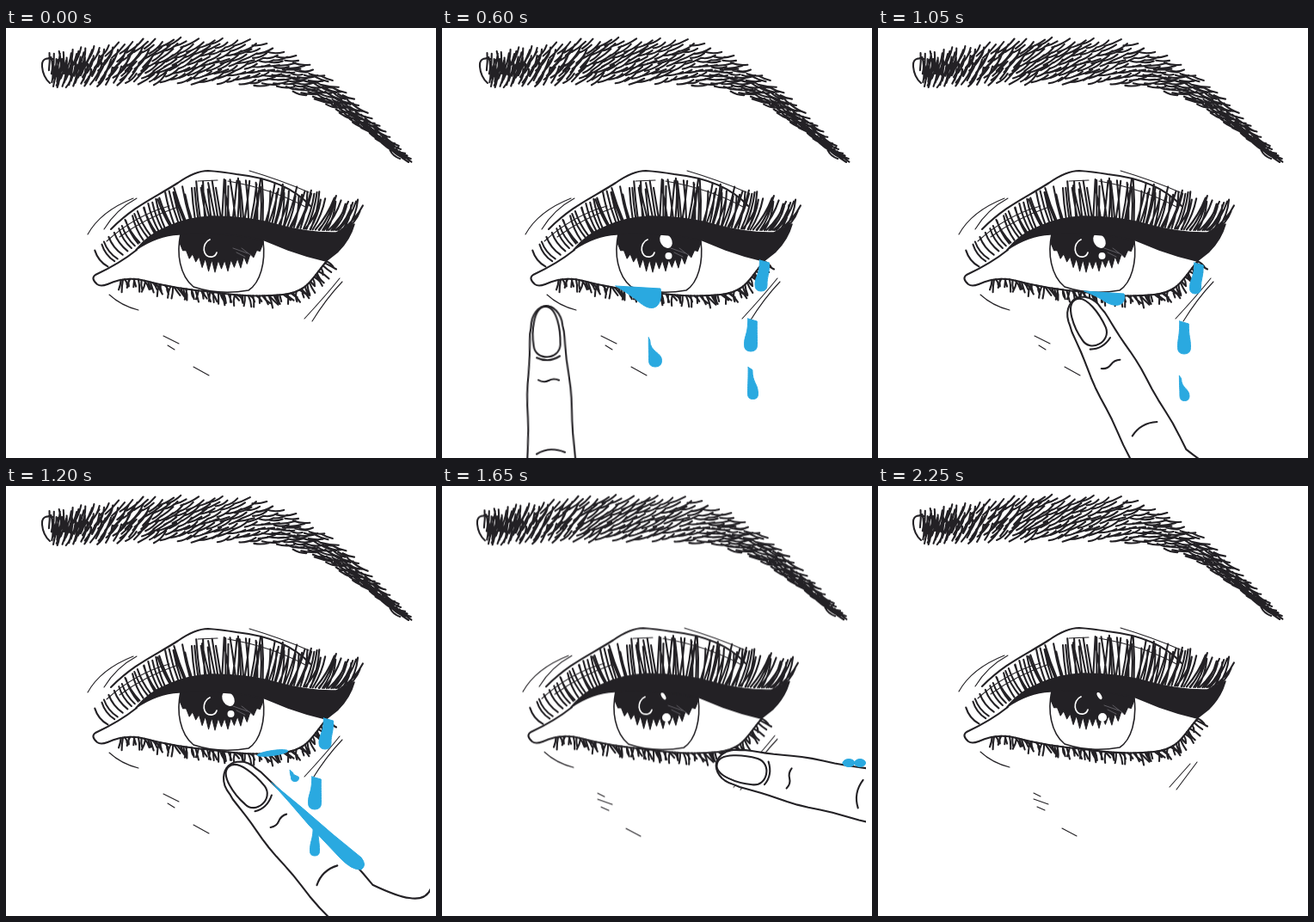
An HTML page that plays this animation: 500 px wide and 500 px high, repeating every 2400 ms.

```html
<!DOCTYPE html>
<html lang="en">
<head>
<meta charset="utf-8">
<title>Wiping a tear</title>
<style>
html, body { margin: 0; width: 100%; height: 100%; overflow: hidden; background: #fff; }
svg { display: block; width: 100vw; height: 100vh; }
path { fill: none; stroke: #232125; stroke-width: 2.1; stroke-linecap: round; stroke-linejoin: round; }
.fine { stroke-width: 1.1; }
.mid { stroke-width: 1.6; }
.ink { fill: #232125; }
.skin { fill: #fff; }
.tear { fill: #2aa9e0; stroke: #2aa9e0; stroke-width: 1; }
.glint { fill: #fff; stroke: none; }
.moon { stroke: #fff; stroke-width: 1.7; }
.ray { stroke: #66646a; stroke-width: .9; }
#eye { animation: jitter 2400ms step-end infinite; }
@keyframes jitter {
  0%, 12.5%, 50% { transform: translate(0, 0); }
  6.25% { transform: translate(1px, 0); }
  18.75% { transform: translate(-1px, -.5px); }
  25%, 31.25% { transform: translate(2px, 0); }
  37.5% { transform: translate(-4px, 0); }
  43.75% { transform: translate(-1px, 0); }
  56.25%, 68.75% { transform: translate(-1px, -.7px); }
  62.5%, 87.5% { transform: translate(0, -1px); }
  75%, 81.25% { transform: translate(2px, -1px); }
  93.75%, 100% { transform: translate(-1px, -1px); }
}
</style>
</head>
<body>
<svg viewBox="0 0 500 500">
  <defs><clipPath id="edge"><rect width="493" height="500"/></clipPath></defs>
  <g id="eye"></g>
  <g id="under"></g>
  <g id="hand" clip-path="url(#edge)"></g>
  <g id="over"></g>
</svg>
<script>
const STEP = 150, COUNT = 16;
const [eye, under, hand, over] = ['eye', 'under', 'hand', 'over'].map(id => document.getElementById(id));

let seed = 11;
const rnd = () => (seed = (seed * 16807) % 2147483647) / 2147483647;
const spread = n => (rnd() - .5) * 2 * n;
const mix = (a, b, t) => a + (b - a) * t;
const mixAll = (a, b, t) => a.map((v, i) => mix(v, b[i], t));
const rad = deg => deg * Math.PI / 180;
const f = n => n.toFixed(1);

function make(parent, tag) {
  return parent.appendChild(document.createElementNS('http://www.w3.org/2000/svg', tag));
}
function add(parent, d, cls = '') {
  const el = make(parent, 'path');
  el.setAttribute('d', d);
  el.setAttribute('class', cls);
  return el;
}

const rules = new Set();
function show(el, from, to = from) {
  const n = to - from + 1;
  rules.add(`@keyframes on${n}{0%{visibility:visible}${n / COUNT * 100}%,100%{visibility:hidden}}`);
  el.style.visibility = 'hidden';
  el.style.animation = `on${n} ${STEP * COUNT}ms ${(from - COUNT) * STEP}ms step-end infinite`;
}
function scene(parent, from, to) {
  const g = make(parent, 'g');
  show(g, from, to);
  return g;
}

// Measures a path so that strokes can be set along it.
function guide(d) {
  const el = add(eye, d), total = el.getTotalLength();
  el.remove();
  return t => { const p = el.getPointAtLength(t * total); return [p.x, p.y]; };
}

function oval(cx, cy, rx, ry, turn = 0) {
  const dx = rx * Math.cos(rad(turn)), dy = rx * Math.sin(rad(turn));
  return `M${cx - dx} ${cy - dy}a${rx} ${ry} ${turn} 1 0 ${2 * dx} ${2 * dy}a${rx} ${ry} ${turn} 1 0 ${-2 * dx} ${-2 * dy}Z`;
}

// One bent hair through its middle or from its root.
function hair(x, y, ang, len, bend, from = .5) {
  const c = Math.cos(ang) * len, s = Math.sin(ang) * len;
  const mx = x + c * (.5 - from) - Math.sin(ang) * bend, my = y + s * (.5 - from) + Math.cos(ang) * bend;
  return `M${f(x - c * from)} ${f(y - s * from)}Q${f(mx)} ${f(my)} ${f(x + c * (1 - from))} ${f(y + s * (1 - from))}`;
}

function drawBrow() {
  const spine = guide('M52 50C100 42 190 36 255 39C350 42 390 85 464 151');
  const n = 330;
  let d = '';
  for (let i = 0; i < n; i++) {
    const u = Math.pow((i + rnd()) / n, 1.15), v = (i * .618) % 1 * 2 - 1;
    const [x, y] = spine(u), [x2, y2] = spine(Math.min(1, u + .01)), [x1, y1] = spine(Math.max(0, u - .01));
    const dir = Math.atan2(y2 - y1, x2 - x1);
    const half = u < .55 ? mix(21, 28, Math.min(1, u * 4)) : mix(27, 4, Math.pow((u - .55) / .45, .75));
    const lean = rad(mix(-78, -38, Math.min(1, u * 3)) * (1 - u * .72) + spread(11));
    const len = mix(17, 27, rnd()) * (1 - u * .25);
    const off = v * Math.max(0, half - Math.abs(Math.sin(lean)) * len / 2);
    d += hair(x - Math.sin(dir) * off, y + Math.cos(dir) * off, dir + lean, len, 1 + rnd() * 2.5);
  }
  add(eye, d + 'M54 36Q41 33 42 45Q43 57 51 64');
}

const RIM = 'M118 298Q140 288 162 294Q195 303 240 307Q285 314 322 310C352 307 356 290 373 271';
const LID = 'M114 281C150 252 185 222 240 221C300 220 340 240 398 234';

function drawLids() {
  add(eye, 'M122 234C150 206 172 198 200 180Q220 166 235 166Q250 167 268 170C305 174 335 186 354 207');
  add(eye, 'M152 258Q132 274 104 287Q98 291 106 298Q110 301 118 298');
  add(eye, RIM);
  add(eye, `M95 240Q110 213 148 198M114 234Q128 211 152 198M117 248Q150 218 190 207M132 243Q160 222 200 208
    M283 166Q320 177 352 191M223 178L246 177M258 178Q310 187 350 209M120 310Q134 323 154 328`, 'fine');
}

function drawIris() {
  add(eye, 'M203 240C198 262 202 288 218 301Q248 311 282 305C296 296 302 272 299 248', 'mid');
  let d = 'M299 232L203 232';
  for (let i = 0; i <= 26; i++) {
    const t = i / 26, arch = Math.pow(Math.sin(Math.PI * t), .6) || 0;
    const spike = i % 2 ? 9 + rnd() * 7 : 0;
    d += `L${f(mix(202, 299, t))} ${f(250 + arch * 20 + spike * arch)}`;
  }
  add(eye, d + 'Z', 'ink fine');
  add(eye, 'M264 256L281 262M268 261L278 266M274 256L287 266', 'ray');
  add(eye, 'M237 246C227 250 228 268 240 266Q244 265 245 261', 'moon');
  const big = scene(eye, 1, 9), small = scene(eye, 10, 15);
  add(big, oval(258.5, 247.5, 9, 6.5, 58) + oval(261.5, 265, 4, 4), 'glint');
  add(small, oval(258.5, 245, 4.5, 2.2, 60) + oval(262, 270, 5, 5), 'glint');
}

function drawLiner() {
  add(eye, 'M151 258Q166 240 186 232Q211 220 240 219Q282 219 316 229Q354 239 384 238L405 228Q400 246 386 260L372 271Q350 266 328 258L301 247Q250 236 201 240Q176 241 151 258Z', 'ink mid');
}

function drawLashes() {
  const lid = guide(LID), rim = guide(RIM), n = 92;
  let d = '';
  for (let i = 0; i < n; i++) {
    const t = Math.pow((i + rnd() * .8) / n, .72), [x, y] = lid(t);
    const full = 24 + 26 * Math.sin(Math.PI * Math.min(1, t * .72 + .02)) ** 1.5 * (t > .9 ? .85 : 1);
    const ang = rad(mix(-132, -58, t) + spread(3 + 9 * t));
    d += hair(x, y, ang, full * (1 - rnd() * (t < .3 ? .1 : .3)), mix(-5, 5, t), 0);
  }
  for (let i = 0; i < 84; i++) {
    const t = .05 + .95 * (i + rnd()) / 84, [x, y] = rim(t);
    d += hair(x, y, rad(mix(82, 48, t * t) + spread(28)), 7 + rnd() * 8, spread(2), 0);
  }
  add(eye, d);
}

function drawCreases() {
  add(scene(eye, 0, 8), 'M183 358L201 367M188 369L196 374M218 394L236 404', 'fine');
  add(scene(eye, 9, 15), 'M182 358L190 362M182 365L199 371M186 374L195 378M215 399L232 408', 'fine');
  add(scene(eye, 0, 11), 'M388 291Q372 311 347 338M391 295Q372 315 356 341', 'fine');
  add(scene(eye, 11, 15), 'M372 322L348 354M364 324L340 351', 'fine');
}

// Finger with its tip at 0,0, pointing up; the right side flares into the hand.
function finger(g, [x, y, turn, wide]) {
  const half = d => wide * (15 * Math.sqrt(1 - (1 - Math.min(d / 20, 1)) ** 2) + 14 * (1 - Math.exp(-d / 85)));
  const side = (sign, end) => {
    const p = [];
    for (let k = 0; k <= 1.001; k += 1 / 24) {
      const d = end * k * k;
      p.push(`${f(sign * (half(d) + (d > 30 ? Math.sin(d / 13) * .7 : 0)))} ${f(d)}`);
    }
    return p;
  };
  g.setAttribute('transform', `translate(${x} ${y}) rotate(${turn})`);
  add(g, 'M' + [...side(-1, 230).reverse(), ...side(1, 215)].join('L') + 'Q44 245 53 255Q66 271 80 263', 'skin');
  add(g, 'M-1 1C-15 1 -18 30 -16 46C-15 64 13 64 15 46C16 30 13 1 -1 1Z', 'skin');
  add(g, 'M-13 60Q0 67 14 59M-12 86q6 4 12 1t12 0M-17 172q16 -9 33 -1');
}

function drawHand() {
  const keys = {
    4: [121, 323, -2, 1], 6: [201, 304, -14, 1.1], 8: [259, 325, -42, 1.15], 10: [304, 322, -70, 1.12],
    11: [319, 322, -78, 1.1], 13: [379, 280, -87, 1], 14: [430, 276, -88, 1]
  };
  for (let k = 4; k <= 14; k++) {
    finger(scene(hand, k), keys[k] || mixAll(keys[k - 1], keys[k + 1], .5));
  }
}

// Falling drop: `top` is the width of its upper end, `lean` shifts that end.
function drop(x, y, w, h, top = .1, lean = 0) {
  const r = w / 2, a = r * top, t = y - h / 2, b = y + h / 2;
  return `M${x + lean - a} ${t}L${x + lean + a} ${t + 3}C${x + lean + a} ${y} ${x + r} ${y} ${x + r} ${b - r}` +
    `Q${x + r} ${b} ${x} ${b}Q${x - r} ${b} ${x - r} ${b - r}C${x - r} ${y} ${x + lean - a} ${y} ${x + lean - a} ${t}Z`;
}
// Water hanging from the lower lid, heavier on its right.
function pool(x, y, w, h, lean = 0) {
  return `M${x} ${y}l${w} 3c${3 + lean} ${h * .6} ${lean - w * .1} ${h * 1.15} ${lean - w * .45} ${h * .62}Q${x + w * .35} ${y + h * .4} ${x} ${y}Z`;
}

function drawTears() {
  const put = (from, to, ...shapes) => add(scene(under, from, to), shapes.join(''), 'tear');
  const corner = drop(371, 288, 14, 36, .8, 4), cheek = drop(359, 357, 15, 38, .7, 2);
  const last = drop(361.5, 413, 12, 37, .4, -3);
  put(1, 1, pool(212, 301, 38, 10));
  put(2, 2, pool(206, 301, 46, 18), drop(372, 282, 11, 20, .8, 3));
  put(3, 3, pool(200, 300, 52, 27), corner, cheek);
  put(4, 5, pool(202, 300, 52, 27), drop(248, 377, 15, 34, .1, -7), corner, cheek, last);
  put(6, 7, drop(369, 291, 13, 36, .8, 4), drop(356, 360, 15, 38, .7, 0), drop(356.5, 419, 11, 29, .2, -5));
  put(6, 6, pool(194, 304, 54, 36, 10), oval(264, 392, 22, 7, -5));
  put(7, 7, pool(240, 306, 46, 16));
  put(8, 9, corner, cheek, drop(336, 337, 9, 13, .4, -4));
  put(8, 8, oval(310, 310.5, 18, 3, -8));

  const smear = 'M309 345Q345 374 380 405L413 432Q420 441 413 446Q402 447 388 432L352 394Q330 368 309 345Z' + drop(359, 412, 11, 36, .5, 1);
  const bead = oval(473, 322, 7, 4.5) + oval(486, 322, 6.5, 4.5);
  const stick = (k, d, move = '') => add(scene(over, k), d, 'tear').setAttribute('transform', move);
  stick(8, smear);
  stick(9, smear, 'translate(22 -2) rotate(-14 259 325)');
  stick(10, bead, 'translate(-5 16)');
  stick(11, bead);
}

drawBrow();
drawLids();
drawIris();
drawLashes();
drawLiner();
drawCreases();
drawTears();
drawHand();

const style = document.createElement('style');
style.textContent = [...rules].join('\n');
document.head.appendChild(style);
</script>
</body>
</html>
```
